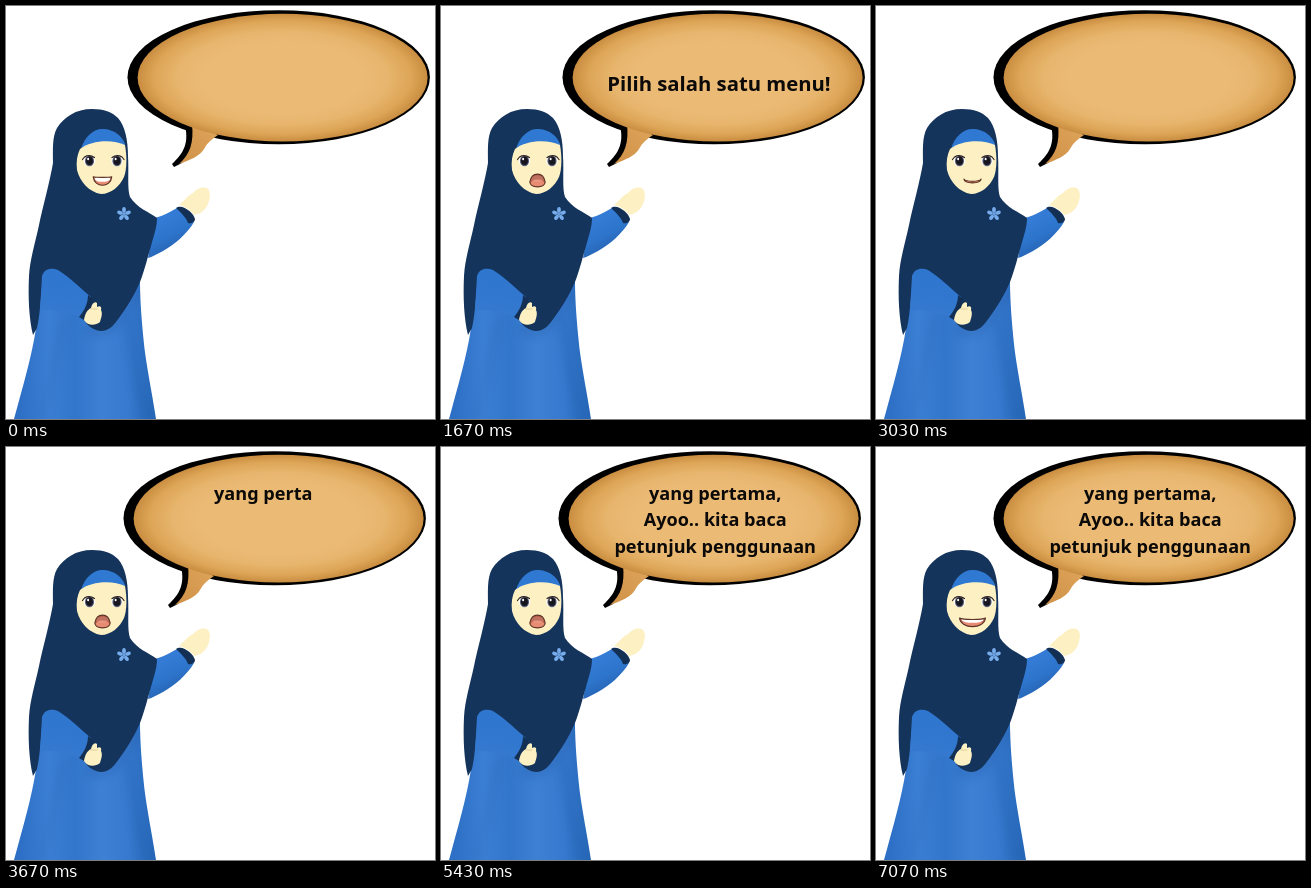
Recreate the animation shown at these times as an HTML page with a canvas. Size 429 by 413 pixels, loop 7.11 s.

```html
<!DOCTYPE html>
<html lang="id">
<head>
<meta charset="utf-8">
<style>
html, body { margin: 0; width: 100%; height: 100%; overflow: hidden; background: #fff; }
canvas { display: block; }
</style>
</head>
<body>
<canvas id="stage" width="429" height="413"></canvas>
<script>
const ctx = document.getElementById('stage').getContext('2d');
const LOOP = 7110, SWITCH = 3030;
const NAVY = '#15345c', BLUE = '#2f79d3', SKIN = '#fdf0c3', INK = '#2b2024';

const shapes = {
  dress: 'M36 268 L134 276 C134 295 136 318 138 338 C140 358 147 392 150 413 L8 413 C16 383 26 350 30 322 Z',
  sleeveRight: 'M149 212 C160 209 167 204 173 201 C180 205 186 210 188 216 C181 228 169 238 157 245 C151 248 146 251 142 252 Z',
  cuffRight: 'M170 202 C176 197 188 207 189 213 C189 216 185 218 182 217 C180 211 175 207 170 202 Z',
  handRight: 'M173 199 C178 195 181 190 187 187 C191 182 198 180 202 183 C205 187 204 193 202 198 C199 205 194 208 188 209 C184 203 179 201 173 199 Z',
  hijab: 'M86 103 C70 103 58 111 51 122 C46 131 47 144 47 157 C44 175 37 200 33 219 C29 238 24 253 23 270 C22 291 23 313 27 329 L31 322 C35 305 34 288 38 270 L78 306 C75 314 84 324 95 325 C103 325 108 319 113 312 C121 301 129 288 134 276 C139 263 142 250 145 240 C148 229 151 221 151 212 C143 206 131 202 124 191 C121 183 123 166 122 150 C122 134 119 120 112 112 C106 106 98 103 86 103 Z',
  cap: 'M75 143 C79 129 89 122 98 123 C109 124 116 130 119 138 L119 148 L75 150 Z',
  face: 'M74 143 C85 134 107 133 119 139 C121 150 121 163 118 171 C114 180 105 188 95 188 C83 186 74 176 71 164 C70 156 71 149 74 143 Z',
  sleeveLeft: 'M36 270 C38 263 45 261 52 264 C65 272 75 283 85 291 C85 299 81 306 76 311 C64 309 47 301 34 305 Z',
  cuffLeft: 'M82 289 L87 293 C86 302 82 309 78 314 L73 311 C78 305 82 298 82 289 Z',
  handLeft: 'M78 314 C79 308 81 304 85 302 C86 297 89 295 91 297 L91 301 C94 299 96 301 95 304 C97 308 95 312 94 316 C89 320 82 320 78 314 Z'
};
for (const key in shapes) shapes[key] = new Path2D(shapes[key]);

function gradient(x0, y0, x1, y1, ...colors) {
  const g = ctx.createLinearGradient(x0, y0, x1, y1);
  colors.forEach((c, i) => g.addColorStop(i / (colors.length - 1), c));
  return g;
}

function paint(key, fill) {
  ctx.fillStyle = fill;
  ctx.fill(shapes[key]);
}

function ellipse(x, y, rx, ry, fill) {
  ctx.fillStyle = fill;
  ctx.beginPath();
  ctx.ellipse(x, y, rx, ry, 0, 0, Math.PI * 2);
  ctx.fill();
}

function line(d, color, width) {
  ctx.strokeStyle = color;
  ctx.lineWidth = width;
  ctx.stroke(new Path2D(d));
}

function drawBubble(shift) {
  ctx.save();
  ctx.translate(shift, 0);
  ellipse(272.7, 71.3, 151.2, 67, '#000');
  ctx.fill(new Path2D('M178 116 C184 136 178 147 166 158 L168 161 L176 157 L200 128 Z'));
  ctx.fillStyle = gradient(175, 155, 205, 125, '#cf9248', '#dca257');
  ctx.fill(new Path2D('M186 118 C188 137 184 148 173 158 C184 154 194 150 198 143 C201 137 206 133 212 129 Z'));
  // Gradient is defined on a unit circle, then stretched
  ctx.translate(276.6, 71.6);
  ctx.scale(145, 63.8);
  const g = ctx.createRadialGradient(0, 0, 0.55, 0, 0, 1);
  g.addColorStop(0, '#ebba75');
  g.addColorStop(0.4, '#e7b56d');
  g.addColorStop(0.75, '#dda557');
  g.addColorStop(1, '#c98d40');
  ellipse(0, 0, 1, 1, g);
  ctx.restore();
}

function drawBody() {
  paint('dress', gradient(15, 0, 150, 0, '#2d70c6', '#3b7fd4', '#3276cb', '#3d80d4', '#3679ce', '#2566b6'));
  ctx.save();
  ctx.clip(shapes.dress);
  ctx.filter = 'blur(4px)';
  line('M122 315 C126 345 133 385 140 413', 'rgba(28,80,155,.25)', 6);
  line('M58 315 C50 350 42 385 36 413', 'rgba(28,80,155,.15)', 6);
  line('M82 323 C96 334 112 322 133 285', 'rgba(24,70,140,.25)', 6);
  ctx.restore();
  paint('sleeveRight', gradient(155, 215, 170, 245, '#337bd4', '#2d74cb', '#2562b0'));
  paint('handRight', SKIN);
  paint('cuffRight', '#142f54');
  paint('hijab', NAVY);
  paint('sleeveLeft', gradient(60, 268, 50, 306, '#2f76cf', '#3177cf', '#3579cf'));
  paint('cuffLeft', '#142f54');
  paint('handLeft', SKIN);
  line('M85 303 L91 303', '#d9c48f', 0.8);
  paint('cap', BLUE);
  paint('face', SKIN);
  for (let i = 0; i < 5; i++) {
    ctx.save();
    ctx.translate(118, 208);
    ctx.rotate(i * Math.PI * 0.4);
    ellipse(0, -4.2, 1.9, 2.9, '#76aceb');
    ctx.restore();
  }
  ellipse(118, 208, 1.7, 1.7, '#6a9fe0');
}

const BLINKS = [1250, 2250, 3270, 4300, 5500, 6550];

function drawEyes(t) {
  if (BLINKS.some(b => t >= b && t < b + 170)) {
    line('M78 160 Q83 164 90 161 M105 161 Q111 164 117 160', INK, 1.2);
    return;
  }
  for (const [x, side] of [[83.5, -1], [111, 1]]) {
    ellipse(x, 155, 5.8, 5.2, '#fff');
    ellipse(x, 155, 4.6, 5.2, '#5a6076');
    ellipse(x, 154.7, 3.5, 4.3, '#17161f');
    ellipse(x - 1.4, 153, 1, 1.2, '#fff');
    line(`M${x - side * 5} 151.5 Q${x} 148 ${x + side * 5} 151 L${x + side * 7} 153.5`, INK, 1.2);
  }
}

// half width, corner y, upper control y, lower control y, teeth
const MOUTHS = {
  S: [9.3, 170.8, 171.5, 182, 1],
  O: [7.7, 176, 165.5, 182.5, 0.1],
  W: [13, 171, 173, 182.5, 1],
  C: [7.5, 173.5, 176.8, 177, 0]
};
const TALK = 'SOCSOWCOSWSOCWSOWSCOSCOOWSCOSW';

function mouthAt(t) {
  const pos = t / LOOP * TALK.length, i = Math.floor(pos);
  const a = MOUTHS[TALK[i]], b = MOUTHS[TALK[Math.min(i + 1, TALK.length - 1)]];
  const k = Math.max(0, (pos - i - 0.7) / 0.3), e = k * k * (3 - 2 * k);
  return a.map((v, n) => v + (b[n] - v) * e);
}

function drawMouth(t) {
  const [w, y, up, low, teeth] = mouthAt(t), x = 96.5;
  const p = new Path2D();
  p.moveTo(x - w, y);
  p.bezierCurveTo(x - w * 0.75, up, x + w * 0.75, up, x + w, y);
  p.bezierCurveTo(x + w * 0.9, low, x - w * 0.9, low, x - w, y);
  p.closePath();
  ctx.save();
  ctx.clip(p);
  ctx.fillStyle = '#b9614e';
  ctx.fillRect(80, 164, 34, 20);
  ellipse(x, 178.5, w * 0.95, 5, '#e88b73');
  ctx.globalAlpha = teeth;
  ellipse(x, 172.8, w * 0.85, 3, '#fff');
  ctx.restore();
  ctx.strokeStyle = '#5c3427';
  ctx.lineWidth = 1.1;
  ctx.stroke(p);
}

function typed(text, size, center, baseline, from, to) {
  ctx.font = `bold ${size}px "Noto Sans", "Open Sans", sans-serif`;
  ctx.fillStyle = '#0c0a08';
  const left = center - ctx.measureText(text).width / 2;
  ctx.fillText(text.slice(from, to), left + ctx.measureText(text.slice(0, from)).width, baseline);
}

const clamp = (v, max) => Math.max(0, Math.min(max, Math.floor(v)));
const GREETING = 'Pilih salah satu menu!';
const STEPS = ['yang pertama,', 'Ayoo.. kita baca', 'petunjuk penggunaan'];

function drawText(t) {
  if (t < SWITCH) {
    const n = GREETING.length;
    const shown = clamp((t - 100) / 1500 * n, n);
    const gone = clamp((t - 2000) / 1000 * n, n);
    typed(GREETING, 20.3, 278, 85, gone, shown);
    return;
  }
  let left = clamp((t - 3190) / 44.5, 48);
  STEPS.forEach((text, i) => {
    typed(text, 18.1, 274.2, 52.5 + i * 26.5, 0, clamp(left, text.length));
    left -= text.length;
  });
}

function frame(now) {
  const t = now % LOOP;
  ctx.fillStyle = '#fff';
  ctx.fillRect(0, 0, 429, 413);
  ctx.lineCap = ctx.lineJoin = 'round';
  drawBubble(t < SWITCH ? 0 : -4);
  drawBody();
  drawEyes(t);
  drawMouth(t);
  drawText(t);
  requestAnimationFrame(frame);
}
requestAnimationFrame(frame);
</script>
</body>
</html>
```
